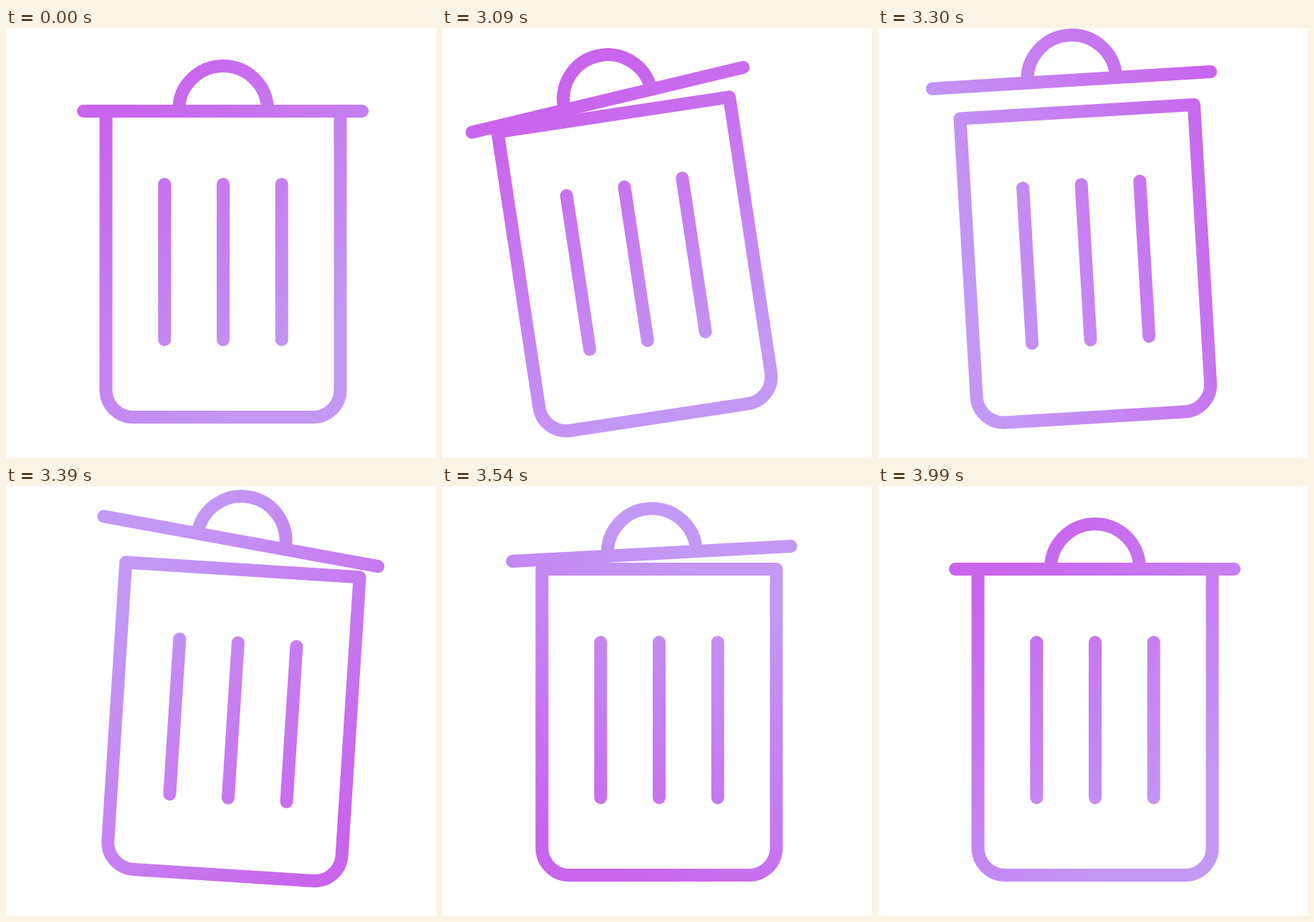
Animation, 600 px wide and 600 px high, one loop 4.02 s. Source, as an HTML page with a canvas:

```html
<!DOCTYPE html>
<html lang="en">
<head>
<meta charset="utf-8">
<title>Trash can</title>
<style>
  html, body { margin: 0; width: 100%; height: 100%; overflow: hidden; background: #fff; }
  canvas { display: block; width: 600px; height: 600px; }
</style>
</head>
<body>
<canvas id="stage" width="600" height="600"></canvas>
<script>
const ctx = document.getElementById('stage').getContext('2d');
const LOOP = 4020, REST = 3000, STEP = 30;
const DARK = '#c964ed', LIGHT = '#c398f4';

// Foot of the can, the point it rocks on; all shapes are measured from it.
const FOOT = { x: 303, y: 543 };
const HALF = 163.5, TALL = 427, CORNER = 38;

// Progress from 0 to 1 between times a and b, with two kinds of easing.
const part = (t, a, b) => Math.min(1, Math.max(0, (t - a) / (b - a)));
const leap = (t, a, b) => Math.sin(part(t, a, b) * Math.PI / 2);
const swing = (t, a, b) => (1 - Math.cos(part(t, a, b) * Math.PI)) / 2;

// The can rocks left, then right, then settles.
const tilt = t => -10 * leap(t, 0, 137) + 15 * swing(t, 180, 440) - 5 * swing(t, 440, 540);

// The lid hops up and flaps against the rocking.
const lidTilt = t => -5.3 * swing(t, 0, 110) + 12 * swing(t, 220, 395)
  - 9.8 * swing(t, 395, 540) + 3.1 * swing(t, 540, 795);
const lidLift = t => 44.5 * (leap(t, 0, 280) - swing(t, 275, 795));
const lidShift = t => -4.6 * leap(t, 0, 90) - 5.4 * swing(t, 390, 540) + 10 * swing(t, 540, 795);

// The gradient makes one turn, slowing down towards the end.
function turn(t) {
  const u = 1 - (1 - part(t, 0, 1000)) ** 1.32;
  return 360 * u * u * (3 - 2 * u);
}

function paint(deg) {
  const a = (227 + deg) * Math.PI / 180;
  const at = r => [303 + Math.cos(a) * r, 305 + Math.sin(a) * r];
  const g = ctx.createLinearGradient(...at(235), ...at(-190));
  g.addColorStop(0, DARK);
  g.addColorStop(1, LIGHT);
  return g;
}

// Paths are placed first and stroked in stage space,
// so the gradient stays independent of the can's pose.
function stroke(path, matrix, cap) {
  const placed = new Path2D();
  placed.addPath(path, matrix);
  ctx.lineCap = cap;
  ctx.stroke(placed);
}

function line(path, x0, y0, x1, y1) {
  path.moveTo(x0, y0);
  path.lineTo(x1, y1);
}

const can = new Path2D();
can.moveTo(-HALF, -TALL);
can.lineTo(HALF, -TALL);
can.arcTo(HALF, 0, 0, 0, CORNER);
can.arcTo(-HALF, 0, -HALF, -TALL, CORNER);
can.closePath();

const bars = new Path2D();
for (let i = -1; i <= 1; i++) line(bars, i * 81.7, -325, i * 81.7, -108);

const rim = new Path2D();
line(rim, -194.5, 0, 194.5, 0);

const handle = new Path2D();
handle.arc(0.5, -1, 62, Math.PI, 0);

function draw(t) {
  const p = Math.max(0, t - REST);
  ctx.fillStyle = '#fff';
  ctx.fillRect(0, 0, 600, 600);
  ctx.strokeStyle = paint(turn(p));
  ctx.lineWidth = 18;
  ctx.lineJoin = 'round';

  const body = new DOMMatrix().translate(FOOT.x, FOOT.y).rotate(tilt(p));
  const lid = body.translate(lidShift(p) - 0.5, -TALL - lidLift(p)).rotate(lidTilt(p));
  stroke(can, body, 'round');
  stroke(bars, body, 'round');
  stroke(handle, lid, 'butt');
  stroke(rim, lid, 'round');
}

const start = performance.now();
function frame() {
  const t = (performance.now() - start) % LOOP;
  draw(Math.floor(t / STEP) * STEP);
  requestAnimationFrame(frame);
}
frame();
</script>
</body>
</html>
```
